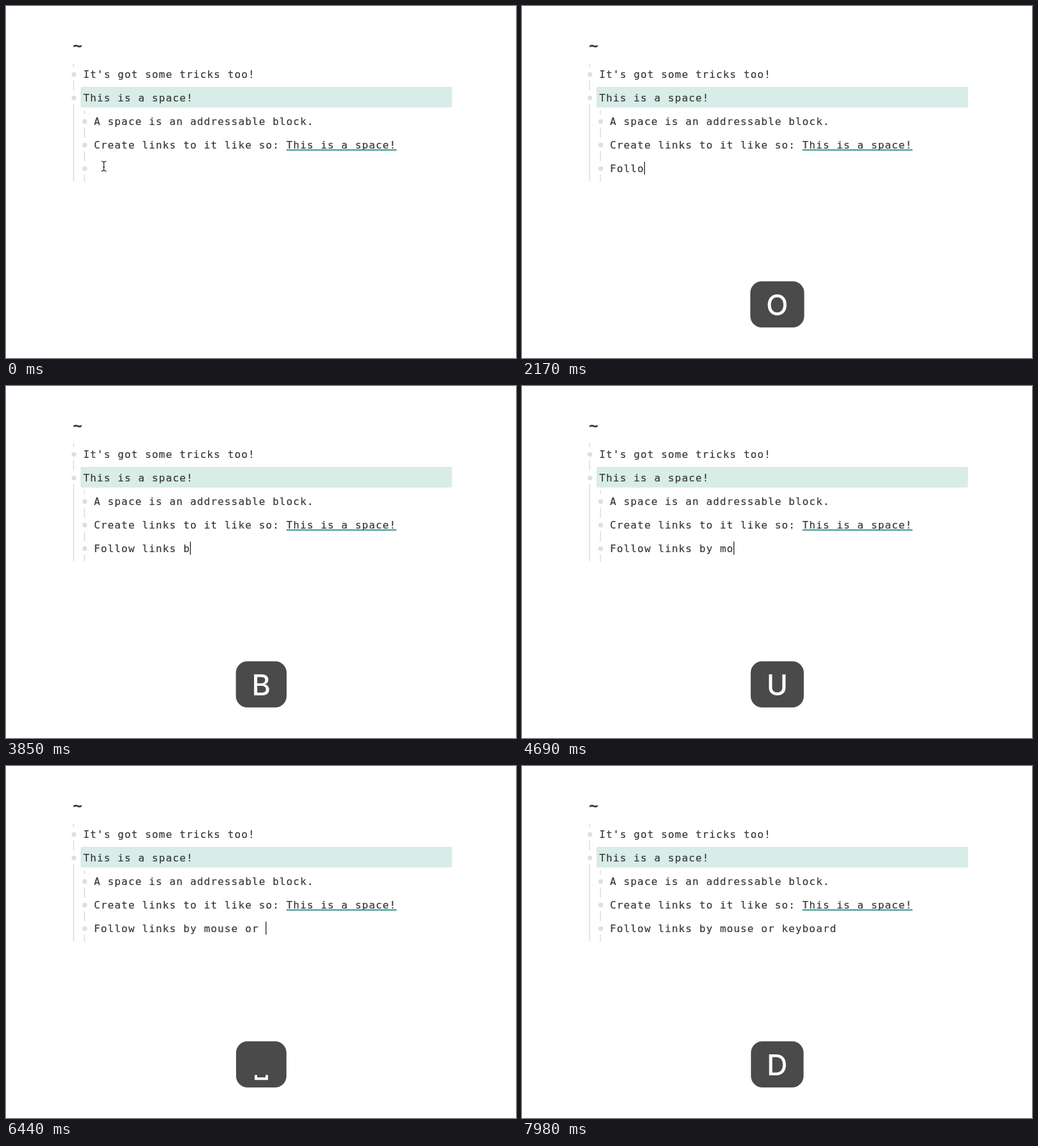
Animation, 800 px wide and 553 px high, one loop 8 s. Source, as an HTML page:

```html
<!DOCTYPE html>
<html lang="en">
<head>
<meta charset="utf-8">
<title>Outline editor</title>
<style>
html, body { margin: 0; width: 100%; height: 100%; overflow: hidden; background: #fff; }
svg { display: block; width: 100%; height: 100%; }
.note { font: 16px "DejaVu Sans Mono", monospace; letter-spacing: 1.147px; fill: #383838; stroke: #383838; stroke-width: .2; }
.home { font: bold 25px "DejaVu Sans Mono", monospace; fill: #383838; }
.tree { fill: #dfdfdf; stroke: none; }
.key { font: 500 45px Inter, Roboto, sans-serif; fill: #fff; }
.icon { fill: none; stroke: #fff; stroke-width: 4; }
</style>
</head>
<body>
<svg viewBox="0 0 800 553">
  <rect x="117" y="127" width="582.5" height="32.6" rx="2" fill="#d8ece8"/>
  <g class="tree" id="tree"></g>
  <text class="home" x="104.8" y="71">~</text>
  <g class="note">
    <text x="121.3" y="113">It's got some tricks too!</text>
    <text x="121.3" y="150">This is a space!</text>
    <text x="138" y="187">A space is an addressable block.</text>
    <text x="138" y="224">Create links to it like so: This is a space!</text>
    <text x="138" y="261" id="typed"></text>
  </g>
  <rect x="440" y="225.4" width="172.5" height="1.7" fill="#15877d"/>
  <rect id="caret" y="244.5" width="1.3" height="20.5" fill="#222"/>
  <g id="pointer" fill="none">
    <path id="beam" d="M149.5 244q3.2 0 4 2q.8-2 4-2M149.5 259.5q3.2 0 4-2q.8 2 4 2M153.5 246V257.5M151.8 253h3.4" stroke="#222" stroke-width="1.2"/>
  </g>
  <g id="badge">
    <rect id="cap" y="432.5" height="72.6" rx="18" fill="#4a4a4a"/>
    <text class="key" id="label" y="486"></text>
    <path class="icon" id="shift" stroke-linejoin="round" d="M387.7 455.5L371 472.5H379V482.2Q379 484.5 381.3 484.5H394.2Q396.5 484.5 396.5 482.2V472.5H404.5Z"/>
    <path class="icon" id="blank" d="M392 485.5V491.3H409V485.5"/>
  </g>
</svg>
<script>
const LOOP = 8000, STEP = 70, LEAD = 60, PITCH = 10.78, LEFT = 138;
const CLICK = 630, CARET_OFF = 7945;
const phrase = "Follow links by mouse or keyboard";
// [characters typed, time in ms]
const pace = [[1, 1280], [9, 2870], [19, 4725], [22, 5460], [23, 5880], [29, 7210], [33, 7810]];

const $ = id => document.getElementById(id);
const show = (id, on) => $(id).setAttribute("visibility", on ? "visible" : "hidden");

function add(name, attrs) {
  const el = document.createElementNS("http://www.w3.org/2000/svg", name);
  for (const k in attrs) el.setAttribute(k, attrs[k]);
  $("tree").append(el);
}

const line = (x, top, bottom) => add("rect", { x: x - 0.8, y: top, width: 1.6, height: bottom - top });
const dot = (cx, cy) => add("circle", { cx, cy, r: 3.7 });

[[90, 96], [117, 133], [154, 275]].forEach(s => line(106, ...s));
[[164, 170], [191, 207], [228, 244], [265, 276]].forEach(s => line(123.1, ...s));
[107.5, 144.5].forEach(y => dot(106.6, y));
[181.5, 218.5, 255.5].forEach(y => dot(123.5, y));

function count(t) {
  if (t < pace[0][1]) return 0;
  for (let i = 1; i < pace.length; i++) {
    const [n0, t0] = pace[i - 1], [n1, t1] = pace[i];
    if (t < t1) return Math.floor(n0 + (n1 - n0) * (t - t0) / (t1 - t0));
  }
  return phrase.length;
}

function drawKey(n) {
  const ch = n ? phrase[n - 1] : "";
  const shift = n === 1, blank = ch === " ";
  const label = $("label");
  show("badge", n > 0);
  $("shift").style.display = shift ? "" : "none";
  $("blank").style.display = blank ? "" : "none";
  label.textContent = blank ? "" : ch.toUpperCase();
  if (!n) return;
  const size = label.getComputedTextLength();
  const width = shift ? 122 : blank ? 79 : size + 50;
  label.setAttribute("x", shift ? 409.5 : 400.3 - size / 2);
  $("cap").setAttribute("x", 400.4 - width / 2);
  $("cap").setAttribute("width", width);
}

let last = -1;
function frame() {
  const t = Math.floor(performance.now() % LOOP / STEP) * STEP;
  if (t !== last) {
    last = t;
    const n = count(t);
    $("typed").textContent = phrase.slice(0, n);
    $("caret").setAttribute("x", LEFT + n * PITCH - 0.3);
    show("caret", t >= CLICK && t < CARET_OFF);
    show("pointer", n === 0);
    drawKey(count(t + LEAD));
  }
  requestAnimationFrame(frame);
}
frame();
</script>
</body>
</html>
```
